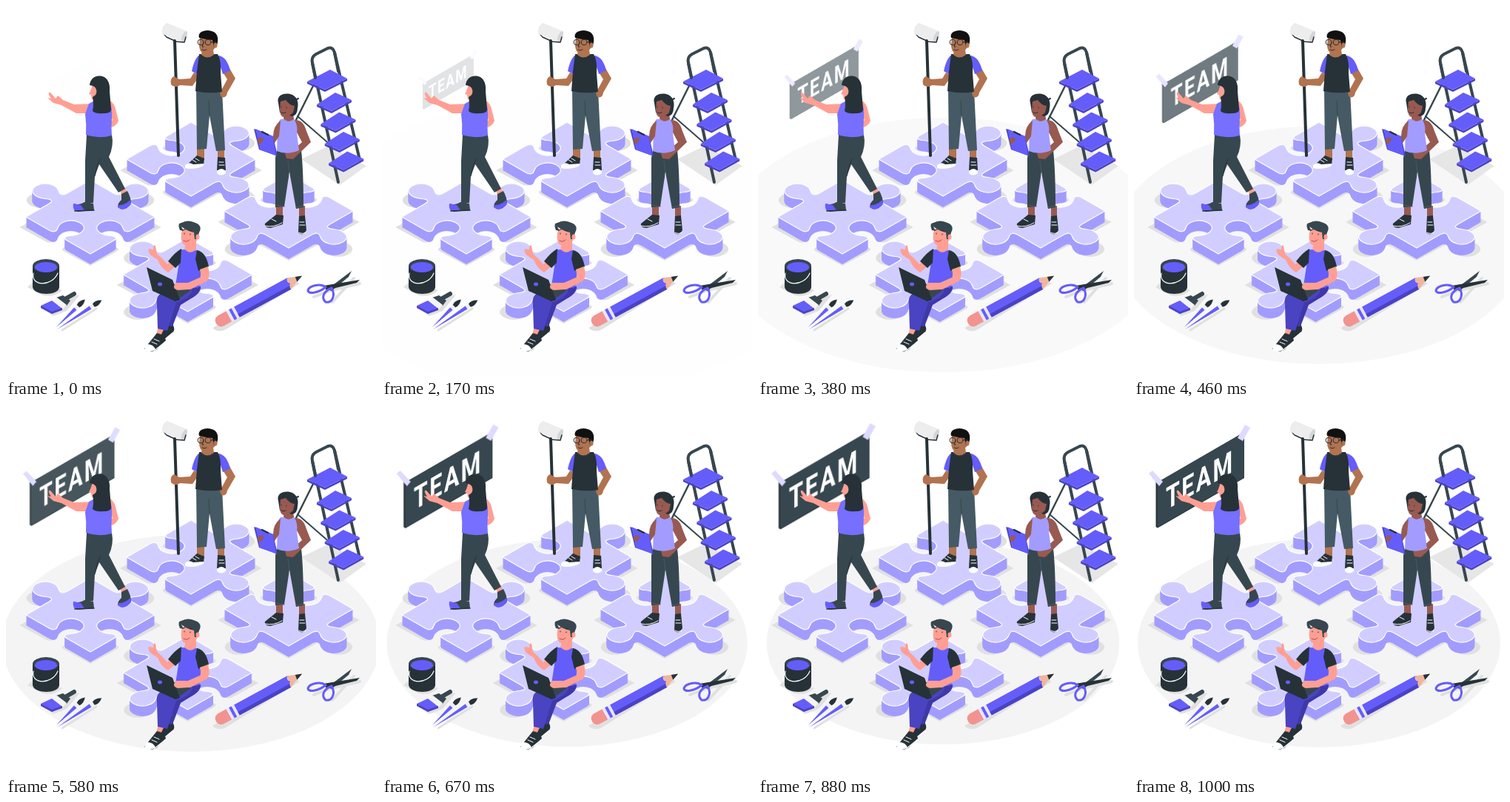
An HTML page with a canvas that plays this animation: 500 px wide and 500 px high, repeating every 1.04 s.

```html
<!DOCTYPE html>
<html lang="en">
<head>
<meta charset="utf-8">
<title>Team puzzle</title>
<style>
html, body { margin: 0; width: 100%; height: 100%; overflow: hidden; background: #fff; }
canvas { display: block; width: 500px; height: 500px; }
</style>
</head>
<body>
<canvas id="stage"></canvas>
<script>
const LOOP = 1040, SIZE = 500;
const DARK = '#263238', SLATE = '#37474f', STEEL = '#455a64';
const MAIN = '#655dfa', DEEP = '#4a43c2', MID = '#766fff', SOFT = '#a29cff', PALE = '#d1ceff';
const PINK = '#ff9f93', TAN = '#b17350', BROWN = '#985a50', SHADE = '#e0e0e0';

const dpr = window.devicePixelRatio || 1;
const setup = c => {
  c.width = c.height = SIZE * dpr;
  const ctx = c.getContext('2d');
  ctx.scale(dpr, dpr);
  ctx.lineCap = ctx.lineJoin = 'round';
  return ctx;
};
const view = setup(document.getElementById('stage'));
let g;

// Paints a still layer once and keeps it as an image.
function layer(paint) {
  const c = document.createElement('canvas');
  g = setup(c);
  paint();
  return c;
}

const fill = (color, d) => { g.fillStyle = color; g.fill(new Path2D(d)); };
const line = (color, w, d) => {
  g.strokeStyle = color;
  g.lineWidth = w;
  g.stroke(new Path2D(d));
};
const oval = (color, x, y, rx, ry) => {
  g.fillStyle = color;
  g.beginPath();
  g.ellipse(x, y, rx, ry, 0, 0, 7);
  g.fill();
};

// One side of a piece: u runs along the edge, v points outwards.
const TAB = [
  [44, 0, 43, 5, 40, 9], [32, 20, 37, 34, 50, 34],
  [63, 34, 68, 20, 60, 9], [57, 5, 56, 0, 64, 0]
];
const CORNERS = [[-87, 0], [0, -50], [87, 0], [0, 50]];

function outline(tabs) {
  const p = new Path2D();
  p.moveTo(...CORNERS[0]);
  tabs.forEach((tab, i) => {
    const a = CORNERS[i], b = CORNERS[(i + 1) % 4], z = CORNERS[(i + 3) % 4];
    const at = (u, v) => [0, 1].map(k =>
      a[k] + (b[k] - a[k]) * u / 100 + (a[k] - z[k]) * 0 + (a[k] - CORNERS[(i + 3) % 4][k]) * v * tab / 100);
    p.lineTo(...at(36, 0));
    for (const c of TAB) p.bezierCurveTo(...at(c[0], c[1]), ...at(c[2], c[3]), ...at(c[4], c[5]));
    p.lineTo(...b);
  });
  p.closePath();
  return p;
}

function piece(x, y, h, tabs) {
  const p = outline(tabs);
  g.save();
  g.translate(x, y + h);
  g.save();
  g.scale(1.1, 1.04);
  g.fillStyle = SHADE;
  g.fill(p);
  g.restore();
  g.fillStyle = SOFT;
  for (let i = 0; i < h; i++) {
    g.fill(p);
    g.translate(0, -1);
  }
  g.fillStyle = PALE;
  g.fill(p);
  g.strokeStyle = '#fff';
  g.lineWidth = 1.2;
  g.stroke(p);
  g.restore();
}

// Tabs: upper left, upper right, lower right, lower left; 1 is a knob, -1 a slot.
function puzzles() {
  piece(250, 207, 15, [-1, 1, 1, -1]);
  piece(382, 277, 15, [-1, -1, 1, 1]);
  piece(114, 285, 14, [1, 1, -1, -1]);
  piece(245.5, 363, 14, [1, -1, -1, 1]);
}

function ladder() {
  fill('#e6e6e6', 'M399 207L436 189L487 216L451 242Z');
  line(SLATE, 2.5, 'M421 96L387 164');
  line(SLATE, 2, 'M394 149L441 190');
  line(SLATE, 4, 'M449 238L414 77Q412 69 419 65L435 57Q442 55 444 63L478 208');
  fill(DEEP, 'M407 102L431 113L461 98V101L431 116L407 105Z');
  fill(MAIN, 'M407 102L438 86L461 98L431 113Z');
  for (let i = 0; i < 4; i++) {
    g.save();
    g.translate(5.4 * i, 26.5 * i);
    fill(DEEP, 'M420 133L440 142L467 127V130L440 145L420 136Z');
    fill(MAIN, 'M420 133L445 117L467 127L440 142Z');
    g.restore();
  }
  line(SLATE, 4, 'M414 77L418 97M444 63L449 88');
}

function thinBrush(x, y, turn, n) {
  g.save();
  g.translate(x, y);
  g.rotate(turn);
  g.translate(n, 0);
  fill(MAIN, `M${-n} 0L-5 -2.5V2.5Z`);
  fill('#eee', 'M-5 -2.5H0V2.5H-5Z');
  fill(DARK, 'M0 -2.5Q6 -5 13 0Q6 5 0 2.5Z');
  g.restore();
}

function tools() {
  fill(SHADE, 'M29 380L40 370L76 384Q66 394 50 391Z');
  fill(DARK, 'M36 351V380C38 392 71 392 72 380V351Z');
  oval(SLATE, 54, 351, 18, 9);
  oval(MAIN, 54, 353, 15, 7);
  line('#fff', 1.2, 'M37 361C33 379 62 380 70 361');

  fill(SHADE, 'M50 410L70 398L100 390L82 412L64 419Z');
  line(SLATE, 6, 'M78 397L92 389');
  fill(SLATE, 'M68 394L77 391L87 398L82 405Z');
  fill('#f4f4f4', 'M62 399L69 394L82 404L76 410Z');
  fill(MAIN, 'M47 405L62 398L76 409L62 416Z');
  fill(DEEP, 'M47 405L62 413L76 408V411L62 416L47 408Z');

  line(SHADE, 3, 'M76 438L122 409');
  thinBrush(68, 434, -.77, 41);
  thinBrush(69, 437, -.58, 59);

  fill(SHADE, 'M279 435L390 371L397 375L302 434Q288 444 279 435Z');
  g.save();
  g.translate(290, 425.5);
  g.rotate(-.498);
  fill('#f29390', 'M0 -8H13V8H0Q-7 7 -7 0Q-7 -7 0 -8Z');
  fill('#e8e6ff', 'M13 -8H26V8H13Z');
  fill(MAIN, 'M17 -8H21V8H17ZM25 -8H107Q102 -3 107 0Q103 5 104 8H25Z');
  fill(DEEP, 'M25 3H105L104 8H25Z');
  fill('#f1b59e', 'M107 -8L125 -1L104 8Q103 4 107 0Q102 -3 107 -8Z');
  fill(DARK, 'M117 -4.2L126 -1L116 3Z');
  g.restore();

  line(SHADE, 4, 'M416 393L440 384L478 375M441 400L470 368');
  fill(SLATE, 'M434 383L467 358L463 366L440 385Z');
  fill(DARK, 'M429 378L478 370L474 374L433 384Z');
  line(MAIN, 3, 'M432 380C425 374 410 378 408 384C408 390 422 388 432 380M440 381C428 386 426 395 432 400C440 402 446 392 440 381');
}

function pointingWoman() {
  fill(PINK, 'M121 132L92 133L77 127L70 121L67 125L60 117Q56 116 59 122L61 125L56 124L64 131L75 134L95 145L111 145Z');
  fill(PINK, 'M141 128Q147 132 149 143L152 155Q150 162 140 165L137 160L144 154L138 143Z');
  fill(PINK, 'M107 262H116L115 270H106ZM153 247L160 244L164 253L157 257Z');
  fill(SLATE, 'M109 174L143 174Q146 189 139 204L161 247L152 252L126 214L120 230L118 266L107 267L107 209Z');
  line(DARK, 1, 'M127 207L124 214L120 230');
  fill(SLATE, 'M91 267Q99 270 106 265L118 267L119 276L97 278Q91 276 91 267Z');
  fill(MAIN, 'M91 267L101 269L106 276L93 277Q90 273 91 267Z');
  line(DARK, 1.5, 'M93 277L119 276');
  fill(SLATE, 'M156 254L164 250Q169 259 169 267Q165 273 158 274L151 272Q151 266 156 262Z');
  fill(MAIN, 'M151 269Q160 270 168 262L169 267Q165 274 157 275Q151 274 151 269Z');
  fill(MID, 'M112 132L123 126L140 128Q144 139 143 151Q142 164 143 175Q125 180 108 174Q109 160 107 146Z');
  fill(PINK, 'M117 106L114 115L112 119L115 120L116 126L121 127V135L130 132V107Z');
  fill(DARK, 'M113 107C114 97 122 93 130 95C138 97 141 106 140 115L142 139Q143 145 131 145Q122 146 117 142Q119 133 117 123Q124 120 122 113Q121 108 113 107Z');
}

function painter() {
  line(DARK, 4, 'M228 47L233 202');
  line(DARK, 1.5, 'M228 47L217 42Q212 38 215 33');
  g.save();
  g.translate(228, 36);
  g.rotate(.4);
  fill('#ededed', 'M-15 -8H14V8H-15Q-20 0 -15 -8Z');
  oval('#d5d5d5', 14, 0, 3, 8);
  g.restore();
  line(DARK, 1.5, 'M228 48L241 49L243 42');

  fill(TAN, 'M258 191H268V208H258ZM286 193H295V208H286Z');
  fill(STEEL, 'M257 112L292 114L296 195L284 196L275 148L271 193L258 194Z');
  line(SLATE, 1, 'M275 148L274 128');
  fill(DARK, 'M258 202L268 206L267 214L251 220L242 217Z');
  fill('#fff', 'M242 215Q247 210 253 214L267 213V216Q254 222 242 219Z');
  line('#fff', 1, 'M252 208L257 211M256 206L261 209');
  fill(DARK, 'M286 204L296 205L297 222H285Z');
  fill('#fff', 'M285 223Q291 217 297 223V226Q291 231 285 226Z');
  line('#fff', 1, 'M288 211H294M288 215H295');

  fill(TAN, 'M254 90L249 98L234 99L227 95Q221 98 223 106Q228 112 235 107L252 108L262 94Z');
  fill(TAN, 'M292 88L302 84L310 98L299 117Q298 125 291 123Q287 118 292 112L299 99Z');
  fill(MAIN, 'M260 67Q254 73 251 88L258 92L266 70ZM287 67Q298 68 303 87L293 92L288 76Z');
  fill(DARK, 'M261 65L286 65Q291 73 290 91L292 116Q274 119 256 115L258 88Z');
  fill(TAN, 'M265 59H280L281 66Q272 73 264 66Z');
  fill(TAN, 'M262 42Q263 36 272 38L284 46L284 55Q276 65 268 64Q261 63 261 52Z');
  fill('#111', 'M261 43C258 34 271 31 278 34C286 36 288 44 285 53L281 56L279 46Q269 45 261 43Z');
  oval(TAN, 283, 53, 2.5, 3.5);
  g.strokeStyle = DARK;
  g.lineWidth = 1;
  for (const x of [263, 273]) {
    g.beginPath();
    g.ellipse(x, 49, 4, 3.7, 0, 0, 7);
    g.stroke();
  }
  line(DARK, 1, 'M277 49L283 48M265 59Q268 61 271 59M267 50L265 55H267');
}

function planner() {
  fill(BROWN, 'M365 269H374V285H365ZM396 270H404V287H396Z');
  fill(SLATE, 'M366 195L399 195Q402 222 402 272L392 274L383 224L376 271L364 272Q364 229 364 205Z');
  line(STEEL, 1, 'M364 269L376 271M392 272L402 270M383 224L381 209');
  fill(DARK, 'M365 282L375 283L374 295L357 300Q348 299 350 294Z');
  line('#fff', 1, 'M350 297Q361 300 373 293M359 288L365 291');
  fill(DARK, 'M396 284L404 283L406 303Q401 312 395 306Z');
  line('#fff', 1, 'M396 306Q400 309 405 306M397 292H403M397 296H404');

  fill(BROWN, 'M391 154Q402 154 406 169L412 184L388 207L379 206L377 199L385 197L400 184L392 169Z');
  fill(SOFT, 'M371 153L389 152Q395 162 393 172L396 195Q380 202 366 196Q367 178 366 172Q365 159 371 153Z');
  fill(BROWN, 'M371 155Q361 162 361 176L346 178L340 182L343 188L361 188L369 176Z');
  fill(DEEP, 'M335 166L361 176L367 203L342 194Z');
  fill(MAIN, 'M337 166L361 176L365 202L343 194Z');
  line(DARK, 2.5, 'M346 170L354 174');
  fill(BROWN, 'M339 181L345 177L349 180L344 186L342 187Z');
  fill(BROWN, 'M376 143H388L389 153Q381 159 375 152Z');
  fill(DARK, 'M368 131C365 121 375 117 384 119C393 121 396 130 394 138Q394 148 386 149L370 144Z');
  fill(BROWN, 'M371 129L378 127Q383 134 390 135L388 144Q382 150 375 150Q370 149 370 139Z');
  line(DARK, 2, 'M391 127L395 125');
  line(DARK, 1, 'M372 136V137M379 137V138M372 144Q375 146 378 144');
}

function sitter() {
  fill(PINK, 'M206 432L214 434L211 446L203 445ZM216 428L225 428L222 438L215 438Z');
  fill(DARK, 'M215 433L225 430Q229 436 226 441L213 451L209 446Z');
  line('#fff', 1.4, 'M226 441L214 451');
  fill('#3f38a8', 'M236 380L263 379Q264 388 249 396L236 404L225 433L214 432L220 398Z');
  fill(DEEP, 'M225 378L252 380Q254 392 230 401L218 439L205 436L204 404Q202 391 211 388Z');
  fill(DARK, 'M204 442L214 445L216 452L203 465Q191 470 187 463Z');
  fill('#fff', 'M191 457Q199 457 202 464Q195 469 188 466Q186 462 191 457Z');
  line('#fff', 1.4, 'M200 466L215 454');
  line('#fff', 1, 'M200 450L207 453M197 454L204 457');

  fill(PINK, 'M232 336L218 349L210 340L204 335L202 324Q199 322 199 329L193 328Q191 332 196 337L205 343Q209 354 219 360L235 347Z');
  fill(MAIN, 'M236 329L258 330Q266 345 263 366L261 380Q245 384 229 378L233 352Z');
  fill(DARK, 'M237 328Q228 333 219 345L229 354L236 347Z');
  fill(DARK, 'M258 330Q270 332 274 352L260 358L256 342Z');
  fill(PINK, 'M262 356L273 352Q277 366 271 372L247 384L231 383Q224 379 229 375L246 374L264 366Z');
  fill(SLATE, 'M201 385L228 376L250 384L229 399Z');
  fill(DARK, 'M190 353L225 370L235 397L229 399L198 385Z');
  oval(MAIN, 208, 376, 3, 2.4);
  fill(PINK, 'M230 374L247 374L248 383L232 384Q223 381 230 374Z');

  fill(PINK, 'M245 317H257V329Q248 337 241 328Z');
  fill(PINK, 'M238 302L252 299L261 306L258 317Q252 326 243 324Q235 321 237 307Z');
  fill(SLATE, 'M235 303Q231 293 237 293Q246 288 256 293Q266 297 261 306L258 315L255 315L254 306Q244 304 237 298L240 304Z');
  oval(PINK, 259, 312, 2.5, 3.5);
  line(DARK, 1, 'M241 307V308M249 308V309M239 303L242 302M248 303L251 304');
  line('#b84b4b', 1, 'M240 317Q244 320 248 316');
}

function sign() {
  fill(DARK, 'M29.5 105L31.5 106L149 38V100L32 167.5L29.5 166Z');
  fill(SLATE, 'M31.5 106L149 38V99L31.5 166.5Z');
  g.save();
  g.transform(.8, -.46, 0, 1.1, 43, 143.5);
  g.fillStyle = '#fff';
  g.font = '700 38px Roboto, sans-serif';
  g.letterSpacing = '3px';
  g.fillText('TEAM', 0, 0);
  g.restore();
  fill('#dddaff', 'M20 94L25 90L39 105L34 111ZM150 28L157 32L147 50L140 46Z');
}

const scene = layer(() => {
  puzzles();
  ladder();
  tools();
  pointingWoman();
  painter();
  planner();
  sitter();
});
const poster = layer(sign);

// Cubic Bezier easing, solved for x by bisection.
function ease(x) {
  const curve = (s, a, b) => 3 * (1 - s) * (1 - s) * s * a + 3 * (1 - s) * s * s * b + s * s * s;
  let lo = 0, hi = 1;
  for (let i = 0; i < 24; i++) {
    const m = (lo + hi) / 2;
    if (curve(m, .36, .5) < x) lo = m; else hi = m;
  }
  return curve(lo, -.01, 1.38);
}

function draw(now) {
  const e = ease(Math.min(1, (now % LOOP + 36) / 1020));
  view.fillStyle = '#fff';
  view.fillRect(0, 0, SIZE, SIZE);
  view.save();
  view.globalAlpha = Math.max(0, Math.min(1, e));

  const floor = 1.5 - e / 2;
  view.fillStyle = '#f4f4f4';
  view.beginPath();
  view.ellipse(250, 323, 245 * floor, 141 * floor, 0, 0, 7);
  view.fill();

  const zoom = .5 + e / 2;
  view.translate(89.5, 102);
  view.scale(zoom, zoom);
  view.drawImage(poster, -89.5, -102, SIZE, SIZE);
  view.restore();
  view.drawImage(scene, 0, 0, SIZE, SIZE);
}

const start = performance.now();
function tick() {
  draw(performance.now() - start);
  requestAnimationFrame(tick);
}
tick();
</script>
</body>
</html>
```
